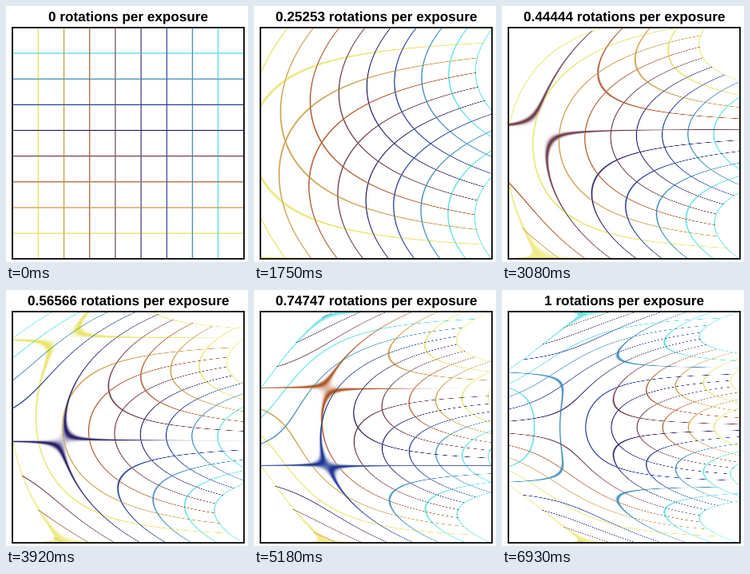
Recreate the animation shown at these times as a matplotlib script. Size 303 by 320 pixels, loop 7000 ms.

```python
import numpy as np
import matplotlib.pyplot as plt
from matplotlib.animation import FuncAnimation
from matplotlib.colors import LinearSegmentedColormap
from matplotlib.patches import Rectangle

W, H, DPI = 303, 320, 64
FRAMES, INTERVAL = 100, 70
LEFT, RIGHT, TOP, BOTTOM = 8, 298, 27, 316
CX, CY, HALF = 153, 171.6, 144.7
CELLS = 9
STEP = 2 * HALF / CELLS

# Line colours run from left to right and from bottom to top
KEYS = {0: "#efeb86", 1: "#e8e468", 3: "#ac5424",
        5: "#241a62", 6: "#1a3492", 8: "#5ce0e4", 9: "#6ee6e8"}
ramp = LinearSegmentedColormap.from_list(
    "lines", [(k / CELLS, c) for k, c in KEYS.items()])
colors = ramp(np.linspace(0, 1, CELLS + 1))[:, :3]
blur = 0.55 + 0.35 * colors.mean(axis=1)  # pale lines are softer

cols = np.arange(LEFT, RIGHT) + 0.5
rows = np.arange(TOP, BOTTOM) + 0.5
u, v = np.meshgrid(cols - CX, CY - rows)


def shade(s):
    """Colour of the nearest grid line at source coordinate s, fading to white."""
    pos = (s + HALF) / STEP
    k = np.clip(np.rint(pos), 0, CELLS).astype(int)
    dist = (pos - k) * STEP
    alpha = np.exp(-(dist / blur[k]) ** 2)
    return 1 - alpha[..., None] * (1 - colors[k])


def rolling_shutter(turns):
    """Scan rows from the bottom up while the grid makes the given turns."""
    theta = 2 * np.pi * turns * (v + HALF) / (2 * HALF)
    sx = u * np.cos(theta) - v * np.sin(theta)
    sy = u * np.sin(theta) + v * np.cos(theta)
    img = np.minimum(shade(sx), shade(sy))
    outside = np.maximum(np.abs(sx), np.abs(sy)) > HALF + 0.5
    img[outside] = 1
    return img


plt.rcParams["text.hinting"] = "none"
fig = plt.figure(figsize=(W / DPI, H / DPI), dpi=DPI, facecolor="white")
ax = fig.add_axes([0, 0, 1, 1])
picture = ax.imshow(rolling_shutter(0), extent=(LEFT, RIGHT, BOTTOM, TOP),
                    interpolation="nearest", aspect="auto")
ax.set_xlim(0, W)
ax.set_ylim(H, 0)
ax.axis("off")
ax.add_patch(Rectangle((LEFT, TOP), RIGHT - LEFT, BOTTOM - TOP, fill=False,
                       edgecolor="#1c1c1c", linewidth=2 * 72 / DPI))
title = ax.text(153.5, 18.5, "", ha="center", va="baseline", color="black",
                family="Liberation Sans", weight="bold",
                fontsize=17.1 * 72 / DPI)


def update(i):
    turns = i / (FRAMES - 1)
    picture.set_data(rolling_shutter(turns))
    title.set_text(f"{turns:.5g} rotations per exposure")
    return picture, title


anim = FuncAnimation(fig, update, frames=FRAMES, interval=INTERVAL,
                     repeat=True, repeat_delay=0)
plt.show()
```
